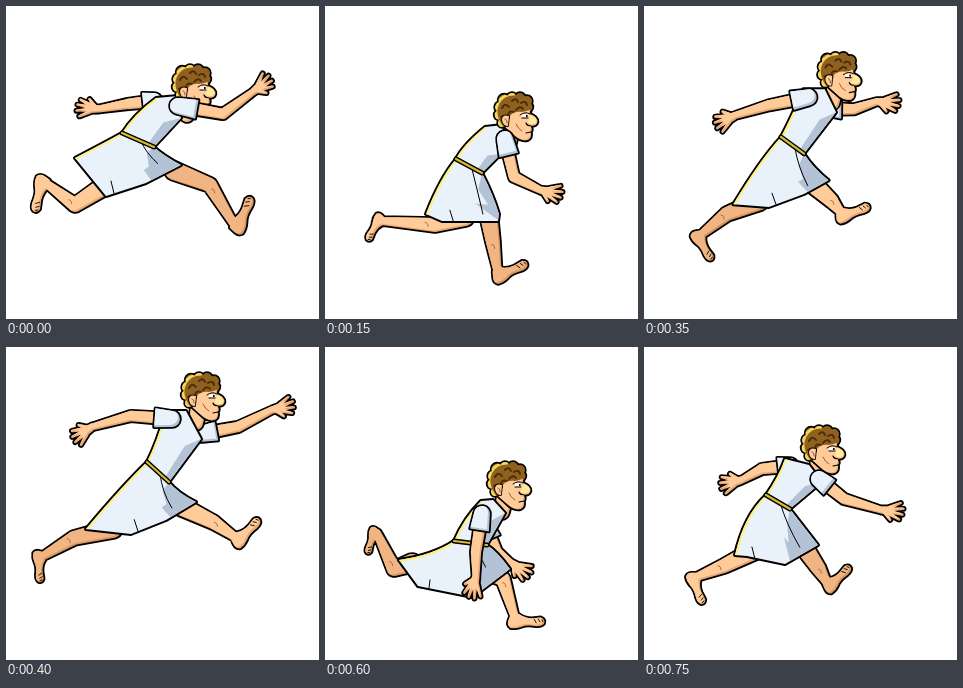
Animation, 313 px wide and 313 px high, one loop 0.8 s. Source, as an HTML page with a canvas:

```html
<!DOCTYPE html>
<html lang="en">
<head>
<meta charset="utf-8">
<title>Runner</title>
<style>
html, body { margin: 0; width: 100%; height: 100%; overflow: hidden; background: #fff; }
canvas { display: block; width: 100vw; height: 100vh; }
</style>
</head>
<body>
<canvas id="stage" width="313" height="313"></canvas>
<script>
const ctx = document.getElementById('stage').getContext('2d');
const LOOP = 800, STEP = 50, COUNT = LOOP / STEP;
const KEYS = [0, 3, 5, 8, 10, 12, 15, COUNT];
const INK = '#000', CLOTH = '#e9f1fa', FOLD = '#b3c2d4', RIM = '#fff07c';
const SKIN = ['#ffcb98', '#e7a873'], DIM = ['#f0b582', '#d6965f'];

// One row per key pose.
// Head: top left of the hair.
const head = [[166,59], [169,87], [170,88], [175,26], [169,79], [162,115], [157,79]];

// Torso: back, shoulder, collar, chest.
const torso = [
  [128,108, 150,92, 172,90, 175,112],
  [138,139, 160,121, 178,119, 176,148],
  [138,148, 158,122, 182,122, 186,135],
  [151,95, 160,64, 180,64, 195,92],
  [150,139, 152,120, 180,118, 192,138],
  [139,171, 156,154, 168,153, 180,166],
  [135,129, 141,112, 165,118, 178,135]
];

// Skirt: back waist, back hip, four hem points, front hip, front waist.
const skirt = [
  [116,127, 96,138, 69,152, 100,190, 140,177, 175,159, 158,150, 148,141],
  [131,153, 115,172, 101,208, 117,215, 173,215, 174,208, 168,188, 157,167],
  [129,163, 114,185, 108,231, 125,229, 160,218, 174,213, 165,195, 154,173],
  [141,115, 117,138, 80,182, 125,187, 160,173, 190,155, 172,146, 163,135],
  [138,155, 122,166, 80,194, 103,213, 143,211, 188,186, 172,181, 157,176],
  [129,194, 108,208, 74,213, 93,239, 148,250, 185,222, 172,204, 162,198],
  [122,148, 100,168, 91,208, 103,209, 141,217, 174,198, 160,180, 146,162]
];

// Arms: shoulder, elbow, wrist, hand angle.
const nearArm = [
  [172,100, 217,108, 247,86, -38],
  [180,133, 189,171, 215,184, 13],
  [162,130, 125,160, 103,168, 168],
  [166,72, 125,69, 86,80, 146],
  [165,126, 122,143, 92,160, 160],
  [157,167, 151,205, 151,229, 102],
  [175,132, 200,152, 237,163, 5]
];
const farArm = [
  [148,95, 122,98, 93,103, 184],
  [168,131, 150,150, 152,165, 100],
  [175,135, 165,150, 167,161, 40],
  [195,87, 232,80, 266,63, -14],
  [192,134, 222,135, 254,129, -14],
  [162,182, 172,205, 186,216, 33],
  [146,119, 118,122, 98,133, 165]
];

// Legs: hip, knee, heel, foot angle, foot length.
const nearLeg = [
  [97,181, 69,199, 31,168, 100, 38],
  [140,211, 110,219, 52,206, 115, 30],
  [156,215, 148,234, 118,250, 28, 34],
  [176,160, 207,175, 233,203, -50, 37],
  [170,189, 195,203, 224,233, -37, 36],
  [164,225, 178,232, 183,281, -3, 37],
  [112,203, 80,219, 41,228, 65, 34]
];
const farLeg = [
  [168,165, 204,179, 236,230, -70, 40],
  [163,205, 168,236, 171,279, -28, 38],
  [132,222, 113,242, 82,278, -2, 38],
  [107,182, 68,191, 27,204, 84, 32],
  [97,203, 70,203, 27,195, 82, 34],
  [87,216, 69,222, 46,179, 104, 28],
  [158,197, 175,222, 186,248, -48, 35]
];

const rad = deg => deg * Math.PI / 180;
const mix = (a, b, k) => a.map((v, i) => v + (b[i] - v) * k);
const pairs = row => row.reduce((out, v, i) => (i % 2 ? out[out.length - 1].push(v) : out.push([v]), out), []);

function capsule(a, b, ra, rb, flat) {
  const p = new Path2D(), t = Math.atan2(b[1] - a[1], b[0] - a[0]), q = Math.PI / 2;
  p.arc(a[0], a[1], ra, t + q, t + 3 * q);
  if (flat) {
    const nx = Math.sin(t) * rb, ny = -Math.cos(t) * rb;
    p.lineTo(b[0] + nx, b[1] + ny);
    p.lineTo(b[0] - nx, b[1] - ny);
  } else p.arc(b[0], b[1], rb, t - q, t + q);
  p.closePath();
  return p;
}

function join(...parts) {
  const p = new Path2D();
  parts.forEach(part => p.addPath(part));
  return p;
}

function line(d, color, width) {
  ctx.strokeStyle = color;
  ctx.lineWidth = width;
  ctx.stroke(typeof d === 'string' ? new Path2D(d) : d);
}

// Inked shape with a shaded lower right edge.
function solid(path, [light, dark], shift = 1.5) {
  line(path, INK, 3.6);
  ctx.fillStyle = dark;
  ctx.fill(path);
  ctx.save();
  ctx.clip(path);
  ctx.translate(-shift, -shift);
  ctx.fillStyle = light;
  ctx.fill(path);
  ctx.restore();
}

function place(path, x, y, deg, scale = 1) {
  const p = new Path2D();
  p.addPath(path, new DOMMatrix().translate(x, y).rotate(deg).scale(scale));
  return p;
}

const HAND = join(
  capsule([0, 0], [9, 0], 3.6, 4.6),
  ...[-27, -9, 8, 25].map((deg, i) => {
    const c = Math.cos(rad(deg)), s = Math.sin(rad(deg)), far = 21 - Math.abs(i - 1.3) * 1.4;
    return capsule([8, (i - 1.5) * 2], [far * c + 2, far * s], 1.9, 1.2);
  }),
  capsule([4, 2], [10, 9], 2, 1.3)
);
const FOOT = new Path2D('M.06 0Q-.03-.08.02-.2L.09-.36.32-.36Q.46-.24.66-.23L.9-.24Q1.03-.18.98-.07Q.92.01.76-.01Q.5-.07.36-.01Q.2.04.06 0Z');
const TOES = new Path2D('M.83-.2L.87-.12M.72-.2L.77-.1M.93-.18L.95-.12');

function arm(row, tone) {
  const [s, e, w] = pairs(row);
  solid(join(capsule(s, e, 6, 5.2), capsule(e, w, 5.2, 3.5), place(HAND, ...w, row[6])), tone);
  solid(capsule(s, mix(s, e, .42), 8, 9.5, true), [CLOTH, FOLD], 2);
}

function leg(row, tone) {
  const [hip, knee, heel, [deg, len]] = pairs(row);
  const c = Math.cos(rad(deg)) * len, s = Math.sin(rad(deg)) * len;
  const ankle = [heel[0] + .2 * c + .28 * s, heel[1] + .2 * s - .28 * c];
  solid(join(capsule(hip, knee, 9, 7), capsule(knee, ankle, 7, 4), place(FOOT, ...heel, deg, len)), tone);
  line(place(TOES, ...heel, deg, len), INK, .9);
  const k = mix(knee, ankle, .15);
  line(`M${k[0] - 2} ${k[1] - 2}q3 0 3 4`, '#8a5a30', .8);
}

function cloth(outline, shade, rim) {
  const p = new Path2D(outline);
  line(p, INK, 4);
  ctx.fillStyle = CLOTH;
  ctx.fill(p);
  ctx.save();
  ctx.clip(p);
  ctx.fillStyle = FOLD;
  ctx.fill(new Path2D(shade));
  line(rim, RIM, 4);
  ctx.restore();
}

function drawSkirt(row) {
  const [wb, hb, a, b, c, d, hf, wf] = pairs(row);
  const rim = `M${wb}Q${hb} ${a}`, fold = mix(c, d, .15), inner = mix(hf, hb, .28);
  cloth(`${rim}L${b}L${c}L${d}Q${hf} ${wf}Z`,
    `M${wf}L${inner}L${mix(inner, fold, .5)}L${mix(hf, b, .35)}L${fold}L${d}Q${hf} ${wf}Z`, rim);
  line(`M${mix(wb, wf, .6)}Q${mix(hf, hb, .3)} ${mix(d, a, .22)}`, INK, 1);
  line(`M${mix(b, c, .2)}L${mix(mix(b, c, .2), hb, .25)}`, INK, 1);
}

function drawTorso(row, wb, wf) {
  const [back, s, n, c] = pairs(row);
  const rim = `M${wb}Q${back} ${s}`;
  cloth(`${rim}L${n}L${c}L${wf}Z`, `M${c}L${mix(c, wb, .3)}L${mix(wf, wb, .2)}L${wf}Z`, rim);
  line(`M${wb}L${wf}`, INK, 5);
  line(`M${wb}L${wf}`, '#d9bd2c', 2.2);
}

const HAIR = new Path2D();
[[8,30,4], [5,22,4.5], [6,14,5], [10,7,5.5], [18,5,5], [26,5,5], [33,8,5], [34,14,4.5], [25,13,8], [14,15,9]]
  .forEach(([x, y, r]) => { HAIR.moveTo(x + r, y); HAIR.arc(x, y, r, 0, 7); });
const FACE = new Path2D('M13 16L35 14Q37 18 36 21Q44 24 43.5 29Q42 34 36 32.5Q39 36 37 39Q38 45 34 47Q27 49 20 42L11 34Z');

function drawHead([x, y]) {
  ctx.save();
  ctx.translate(x, y);
  solid(FACE, SKIN, 1);
  line(HAIR, INK, 3.4);
  ctx.fillStyle = '#90601f';
  ctx.fill(HAIR);
  ctx.save();
  ctx.clip(HAIR);
  line('M9 36Q-2 22 4 10Q9 1 20 1', '#f2d55a', 3);
  line('M8 15q3-6 7-1m3-6q4-4 6 1m3 1q5-3 6 2M14 22q1-5 6-3m2-2q4-5 7-1M7 24q4-3 5 1', '#4d2d08', 2);
  ctx.restore();
  ctx.fillStyle = SKIN[0];
  ctx.fill(new Path2D('M16 23Q20 18 28 19L36 17L35 27L24 38L16 36Z'));
  const ear = new Path2D('M15 23Q8 21 8 27Q9 33 14 33Z');
  line(ear, INK, 1.8);
  ctx.fill(ear);
  line('M11 26q2 0 2 4', '#8a5a30', 1);
  ctx.fillStyle = '#fff';
  ctx.fill(new Path2D('M27 23Q31 19 35 23Q31 26 27 23Z'));
  line('M26 22Q31 18 36 21M28 25L34 25', INK, 1);
  ctx.fillStyle = INK;
  ctx.fillRect(32, 22, 1.6, 2);
  ctx.fillStyle = '#ffeaa0';
  ctx.fill(new Path2D('M36 22Q44 25 42.5 29.5Q40 33 34 30Z'));
  line('M36 32.5Q33 33 32 30M32 40L37 39', INK, 1.2);
  line('M22 31Q24 36 28 38', '#9c6234', 1);
  ctx.restore();
}

function render(step) {
  let i = 0;
  while (KEYS[i + 1] <= step) i++;
  const k = (step - KEYS[i]) / (KEYS[i + 1] - KEYS[i]);
  const pose = rows => mix(rows[i], rows[(i + 1) % rows.length], k);

  const [hx, hy] = pose(head), sk = pose(skirt);
  ctx.setTransform(1, 0, 0, 1, 0, 0);
  ctx.fillStyle = '#fff';
  ctx.fillRect(0, 0, 313, 313);
  ctx.lineJoin = ctx.lineCap = 'round';

  arm(pose(farArm), SKIN);
  leg(pose(farLeg), DIM);
  leg(pose(nearLeg), SKIN);
  solid(capsule([hx + 18, hy + 34], [hx + 15, hy + 50], 8, 7), SKIN);
  drawSkirt(sk);
  drawTorso(pose(torso), sk.slice(0, 2), sk.slice(14));
  drawHead([hx, hy]);
  arm(pose(nearArm), SKIN);
}

const start = performance.now();
let shown = -1;
function tick() {
  const step = Math.floor((performance.now() - start) % LOOP / STEP);
  if (step !== shown) render(shown = step);
  requestAnimationFrame(tick);
}
tick();
</script>
</body>
</html>
```
